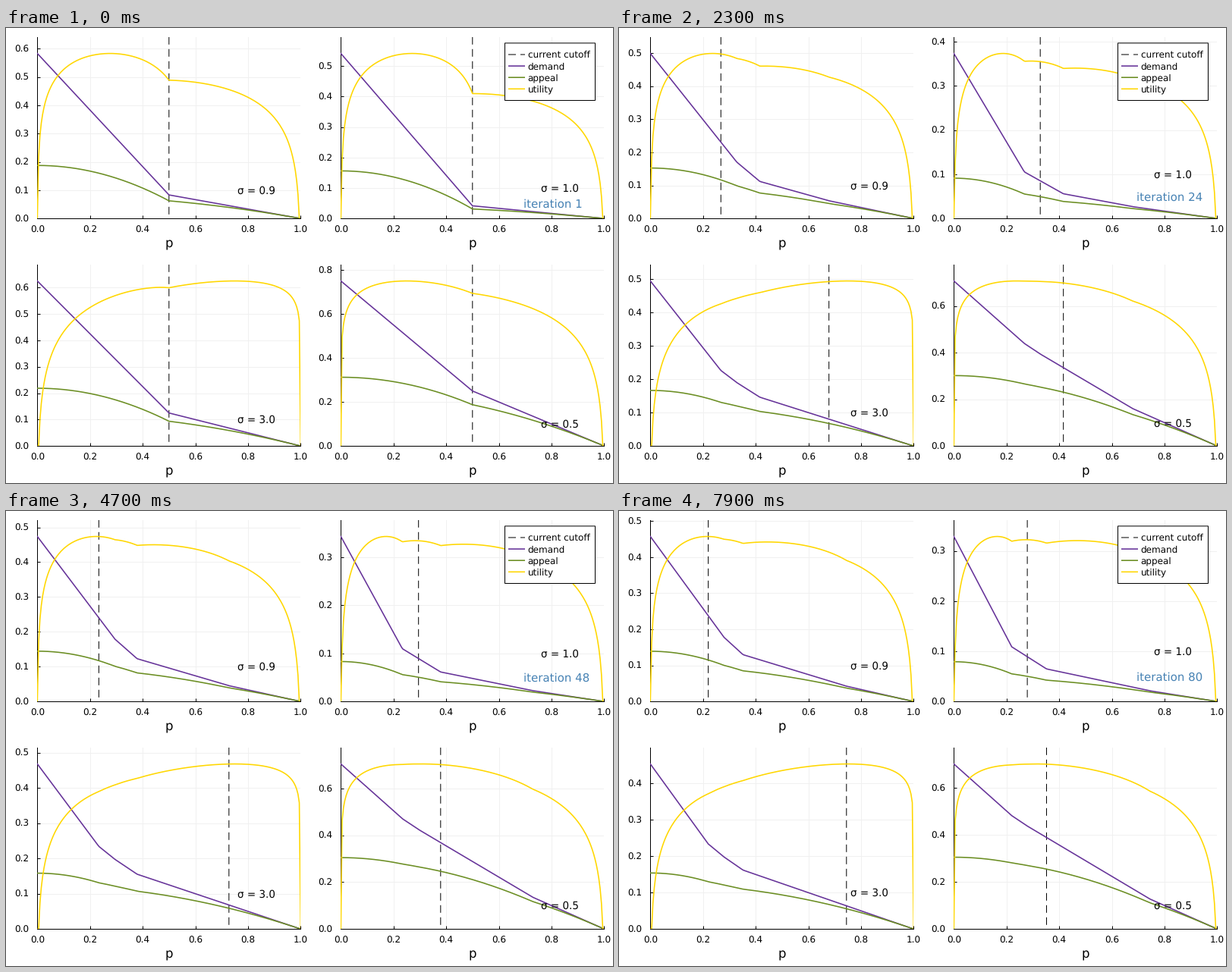
Write a matplotlib script that moves like this. It is 800x600 px and loops after 8000 ms.

```python
import numpy as np
import matplotlib.pyplot as plt
from matplotlib.animation import FuncAnimation
from matplotlib.patches import Rectangle
from matplotlib.ticker import FormatStrFormatter, MultipleLocator

W, H, DPI = 800, 600, 100
FRAMES = 80
PX = 72 / DPI  # points per pixel

WEIGHT = np.array([2.0, 1.0, 3.0, 6.0])
SIGMA = np.array([0.9, 1.0, 3.0, 0.5])
GRID = np.linspace(0, 1, 201)
PURPLE, GREEN, GOLD, BLUE = "#663399", "#6b8e23", "#ffd700", "#4682b4"

plt.rcParams["font.family"] = "DejaVu Sans"
plt.rcParams["text.hinting"] = "none"


def curves(i, cut, p):
    """Demand and appeal of school i at cutoffs p, the others held fixed."""
    others = np.delete(np.arange(4), i)
    others = others[np.argsort(cut[others], kind="stable")]
    edges = np.concatenate([[0], cut[others], [1]])
    rivals = np.concatenate([[0], np.cumsum(WEIGHT[others])])
    share = WEIGHT[i] / (WEIGHT[i] + rivals)
    p = np.atleast_1d(p)[:, None]
    lo = np.maximum(p, edges[:-1])
    hi = np.maximum(edges[1:], lo)
    return (hi - lo) @ share, (hi**2 - lo**2) @ share / 2


def utility(i, demand):
    """Log utility rescaled to run from 0 to the largest demand."""
    inner = slice(1, -1)
    u = SIGMA[i] * np.log(GRID[inner]) + np.log(demand[inner])
    out = np.zeros_like(GRID)
    out[inner] = (u - u.min()) / (u.max() - u.min()) * demand[0]
    return out


def cutoff_path():
    """Gradient ascent on log utility with a shrinking step."""
    cut = np.full(4, 0.5)
    path = [cut]
    for n in range(1, FRAMES):
        order = np.argsort(cut, kind="stable")
        share = np.empty(4)
        share[order] = WEIGHT[order] / np.cumsum(WEIGHT[order])
        demand = np.array([curves(i, cut, cut[i])[0][0] for i in range(4)])
        cut = cut + 0.005 * n**-0.2 * (SIGMA / cut - share / demand)
        path.append(cut)
    return path


PATH = cutoff_path()

fig = plt.figure(figsize=(W / DPI, H / DPI), dpi=DPI, facecolor="white")


def label(ax, x, y, size, drop, **kw):
    return ax.annotate("", (x, y), xytext=(0, -drop * PX), textcoords="offset points",
                       fontsize=size * PX, va="baseline", zorder=4, **kw)


def dashed(ax, x, y):
    return ax.plot(x, y, color="black", lw=PX, dashes=(10, 6),
                   dash_capstyle="butt", snap=False)[0]


def make_panel(i):
    left = 41.3 + 400 * (i % 2)
    bottom = 251.2 + 300 * (i // 2)
    ax = fig.add_axes([left / W, 1 - bottom / H, 347 / W, 239.4 / H])
    ax.set_xlim(0, 1)
    ax.set_axisbelow(True)
    ax.grid(color="#f0f0f0", lw=PX)
    for side, spine in ax.spines.items():
        spine.set(visible=side in ("left", "bottom"), linewidth=PX, zorder=1)
    ax.tick_params(direction="in", length=4 * PX, width=PX, labelsize=12 * PX)
    ax.tick_params(axis="x", pad=9.6 * PX)
    ax.tick_params(axis="y", pad=11 * PX)
    for axis, step in ((ax.xaxis, 0.2), (ax.yaxis, 0.2 if i == 3 else 0.1)):
        axis.set_major_locator(MultipleLocator(step))
        axis.set_major_formatter(FormatStrFormatter("%.1f"))
    fig.text((left + 173.5) / W, 1 - (bottom + 38.6) / H, "p",
             fontsize=16.5 * PX, ha="center", va="baseline")
    cutoff = dashed(ax, [0.5, 0.5], [1, 0])
    lines = [ax.plot(GRID, GRID, color=c, lw=1.6 * PX)[0] for c in (PURPLE, GREEN, GOLD)]
    note = label(ax, 0.759, 0.1, 13.5, 4.9)
    note.set_text(f"σ = {SIGMA[i]:.1f}")
    return ax, cutoff, lines


panels = [make_panel(i) for i in range(4)]
counter = label(panels[1][0], 0.694, 0.05, 15, 5.5, color=BLUE)


def make_legend():
    ax = fig.add_axes([0, 0, 1, 1], zorder=5)
    ax.set(xlim=(0, W), ylim=(H, 0))
    ax.axis("off")
    ax.add_patch(Rectangle((657.5, 19.9), 119, 75.6, fc="white", ec="black",
                           lw=PX, snap=False))
    names = ("current cutoff", "demand", "appeal", "utility")
    for k, (name, color) in enumerate(zip(names, (None, PURPLE, GREEN, GOLD))):
        x, y = [662, 684], 35 + 15.1 * k
        if color:
            ax.plot(x, [y, y], color=color, lw=1.6 * PX, snap=False,
                    solid_capstyle="butt")
        else:
            dashed(ax, x, [y, y])
        ax.text(687.6, y + 4.3, name, fontsize=12 * PX, va="baseline")


make_legend()


def update(k):
    cut = PATH[k]
    for i, (ax, cutoff, lines) in enumerate(panels):
        demand, appeal = curves(i, cut, GRID)
        top = 1.1 * demand[0]
        ax.set_ylim(0, top)
        cutoff.set_data([cut[i], cut[i]], [top, 0])
        for line, y in zip(lines, (demand, appeal, utility(i, demand))):
            line.set_ydata(y)
    counter.set_text(f"iteration {k + 1}")
    return []


anim = FuncAnimation(fig, update, frames=FRAMES, interval=100, repeat=True,
                     repeat_delay=0, blit=False)
plt.show()
```
